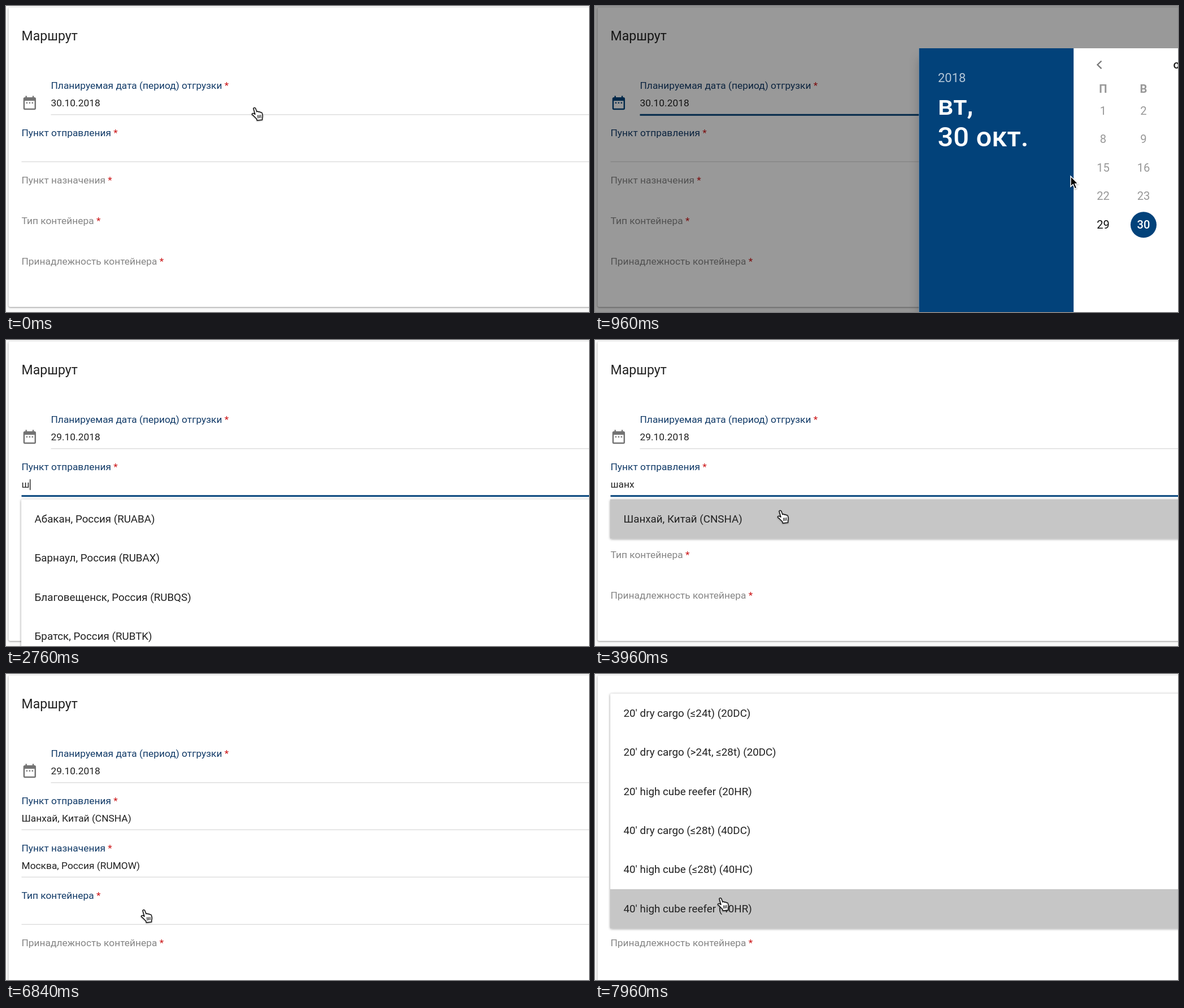
Recreate the animation shown at these times as an HTML page. Size 1032x543 px, loop 8 s.

```html
<!DOCTYPE html>
<html lang="ru">
<head>
<meta charset="utf-8">
<title>Маршрут</title>
<style>
  html, body { margin: 0; width: 100%; height: 100%; overflow: hidden; background: #f9f9f9; }
  svg { display: block; width: 100vw; height: 100vh; font-family: Roboto, sans-serif; font-size: 17.35px; fill: #212121; }
  .card { fill: #fff; filter: drop-shadow(0 1.5px 1.8px rgba(0,0,0,.42)); }
  .menu { fill: #fff; filter: drop-shadow(0 1.5px 2px rgba(0,0,0,.42)); }
  .dialog { fill: #fff; filter: drop-shadow(0 18px 9px rgba(0,0,0,.22)); }
  .item { font-size: 18.8px; }
  .day { font-size: 20.2px; text-anchor: middle; }
  .head { font-size: 49px; font-weight: 500; fill: #fff; }
</style>
</head>
<body>
<svg id="stage" viewBox="0 0 1032 543" preserveAspectRatio="none"></svg>
<script>
const LOOP = 8000, ROW = 69.4, FULL = 1960, BLUE = '#02427a';
const stage = document.getElementById('stage');
const pen = document.createElement('canvas').getContext('2d');

// Timeline of the user's actions, in ms
const T = {
  dateOpen: 120, dayPick: 1260, dateClose: 1523,
  fromFocus: 2030, fromFilter: 3560, fromSet: 4280,
  toFocus: 4700, toFilter: 5960, toSet: 6560,
  typeOpen: 7060
};
const fromKeys = { word: 'шанх', at: [2720, 2800, 2920, 3080] };
const toKeys = { word: 'моск', at: [5040, 5140, 5240, 5480] };

const shanghai = 'Шанхай, Китай (CNSHA)', moscow = 'Москва, Россия (RUMOW)';
const cities = ['Абакан, Россия (RUABA)', 'Барнаул, Россия (RUBAX)',
  'Благовещенск, Россия (RUBQS)', 'Братск, Россия (RUBTK)'];
const types = ["20' dry cargo (≤24t) (20DC)", "20' dry cargo (&gt;24t, ≤28t) (20DC)",
  "20' high cube reefer (20HR)", "40' dry cargo (≤28t) (40DC)",
  "40' high cube (≤28t) (40HC)", "40' high cube reefer (40HR)"];

const menus = [
  { open: T.fromFocus + 40, close: T.fromSet, top: 282.8, rows: t => t < T.fromFilter ? cities : [shanghai] },
  { open: T.toFocus + 40, close: T.toSet, top: 366.5, rows: t => t < T.toFilter ? cities : [moscow] },
  { open: T.typeOpen, close: Infinity, top: 34.8, rows: () => types }
];

// Pointer hot spot: time, x, y
const path = [
  [0, 439.5, 181], [260, 439.5, 181], [960, 842, 302], [1200, 897, 380], [1360, 897, 380],
  [1760, 371, 255], [1960, 368, 257], [3560, 368, 257], [3900, 327.5, 303], [4250, 327.5, 303],
  [4600, 325, 341], [5960, 325, 341], [6250, 290, 398], [6540, 290, 398],
  [6810, 243.5, 419], [7150, 243.5, 419], [7850, 221.5, 398], [8000, 221.5, 398]
];
// Pointer shape from each time on
const shapes = [[0, 'hand'], [220, 'arrow'], [1130, 'hand'], [1420, 'arrow'], [1900, 'beam'], [2720, ''],
  [3560, 'beam'], [3680, 'hand'], [4440, 'beam'], [5040, ''], [5960, 'beam'], [6080, 'hand']];

const pointers = {
  arrow: `<path d="M0 0V18.6L4.2 14.6 7.4 22.2 10.8 20.8 7.7 13.4H13.2Z" fill="#000" stroke="#fff" stroke-width="1.5"/>`,
  beam: `<path d="M-3.5-9Q0-9 0-6.5V6.5Q0 9-3.5 9M3.5-9Q0-9 0-6.5V6.5Q0 9 3.5 9M-2 3H2" fill="none" stroke="#333" stroke-width="1.4"/>`,
  hand: `<g transform="translate(-5.5 -1.5)" fill="#fff" stroke="#111" stroke-width="1.5" stroke-linejoin="round">
    <path d="M4 2.2C4.6.6 7 .6 7.8 2.4L10 8.2C11 7.2 12.6 7.4 13.2 8.6 14.2 7.8 15.8 8.2 16.3 9.4 17.6 8.8 19 9.6 19.4 11 20.4 14 20.6 17 19.6 19.2V22.5L10.4 23.5 9.6 20.6C7 18.5 5 15.5 2 13.6.6 12.4 2 10.6 4 11 5.2 11.3 6 12 7 12.8Z"/>
    <path d="M11.5 14.2l.8 5.6M14.1 13.9l.6 5.5M16.8 13.6l.4 5.4" fill="none" stroke-width="1.2"/></g>`
};

const clamp = v => Math.max(0, Math.min(1, v));
const easeOut = p => 1 - (1 - clamp(p)) ** 4;
const shown = (t, on, off, inMs, outMs) => t < on ? 0 : t < off
  ? easeOut((t - on) / inMs) : 1 - easeOut((t - off) / outMs);

const text = (x, y, s, attrs = '') => `<text x="${x}" y="${y}" ${attrs}>${s}</text>`;
const rect = (x, y, w, h, attrs = '') => `<rect x="${x}" y="${y}" width="${w}" height="${h}" ${attrs}/>`;
const typed = (t, k) => k.word.slice(0, k.at.filter(a => a <= t).length);

function pointerAt(t) {
  const i = Math.max(1, path.findIndex(p => p[0] > t));
  const [t0, x0, y0] = path[i - 1], [t1, x1, y1] = path[i];
  const p = clamp((t - t0) / (t1 - t0)), e = p * p * (3 - 2 * p);
  return { x: x0 + (x1 - x0) * e, y: y0 + (y1 - y0) * e, shape: shapes.filter(s => s[0] <= t).pop()[1] };
}

function label(x, y, s, on) {
  return text(x, y, `${s} <tspan fill="#cc1719">*</tspan>`, `fill="${on ? '#123b68' : '#858585'}"`);
}

function underline(x, y, focus) {
  const mid = 990, half = (mid - x) * focus;
  return rect(x, y - .6, FULL - x, 1.4, 'fill="#dcdcdc"') +
    (focus > 0 ? rect(mid - half, y - 1, half * 2, 3, `fill="${BLUE}"`) : '');
}

function caret(t, s, y, focus, keys) {
  const last = Math.max(focus, ...keys.at.filter(a => a <= t));
  if (Math.floor((t - last) / 530) % 2) return '';
  pen.font = '17.35px Roboto, sans-serif';
  return rect(28 + pen.measureText(s).width, y - 14.5, 1.4, 19);
}

function form(t) {
  const fromDone = t >= T.fromSet, toDone = t >= T.toSet;
  const picking = t >= T.dateOpen && t < T.dateClose;
  const fields = [
    { name: 'Пункт отправления', on: true, value: fromDone ? shanghai : typed(t, fromKeys),
      focus: T.fromFocus, blur: T.fromSet, keys: fromKeys },
    { name: 'Пункт назначения', on: fromDone, value: toDone ? moscow : typed(t, toKeys),
      focus: T.toFocus, blur: T.toSet, keys: toKeys },
    { name: 'Тип контейнера', on: toDone, value: '' },
    { name: 'Принадлежность контейнера', on: false }
  ];
  let y = 231, out = '';
  for (const f of fields) {
    out += label(27.5, y, f.name, f.on);
    if (f.on) {
      out += text(27.5, y + 30.7, f.value);
      out += underline(27.5, y + 45.3, f.focus ? shown(t, f.focus, f.blur, 450, 120) : 0);
      if (f.focus && t >= f.focus && t < f.blur) out += caret(t, f.value, y + 30.7, f.focus, f.keys);
    }
    y += f.on ? 84 : 72;
  }
  return rect(4.5, 2.5, FULL, y + .5, 'rx="3" class="card"') +
    text(27.5, 61, 'Маршрут', 'font-size="23.1"') +
    `<path transform="translate(27 157) scale(1.24)" fill="${picking ? BLUE : '#737373'}" d="M9 11H7v2h2zm4 0h-2v2h2zm4 0h-2v2h2zm2-7h-1V2h-2v2H8V2H6v2H5C3.9 4 3 4.9 3 6V20c0 1.1.9 2 2 2h14c1.1 0 2-.9 2-2V6c0-1.1-.9-2-2-2zm0 16H5V9h14z" fill-rule="evenodd"/>` +
    label(79.5, 147, 'Планируемая дата (период) отгрузки', true) +
    text(79.5, 177.7, t < T.dateClose ? '30.10.2018' : '29.10.2018') +
    underline(79.5, 192.7, shown(t, T.dateOpen, T.dateClose, 450, 120)) + out;
}

function menu(t, m, ptr) {
  const k = shown(t, m.open, m.close, 400, 180);
  if (k <= 0) return '';
  const rows = m.rows(t), grow = t < m.close ? k : 1;
  const hover = ptr.shape === 'hand' ? Math.floor((ptr.y - m.top) / ROW) : -1;
  const body = rows.map((s, i) =>
    (i === hover ? rect(27, i * ROW, FULL, ROW, 'fill="#c6c6c6"') : '') +
    text(50.5, i * ROW + 41, s, 'class="item"')).join('');
  return `<g transform="translate(0 ${m.top}) scale(1 ${grow})" opacity="${k}">` +
    rect(27, 0, FULL, rows.length * ROW, 'rx="2" class="menu"') + body + '</g>';
}

function calendar(t) {
  const k = shown(t, T.dateOpen, T.dateClose, 450, 450);
  const shade = shown(t, T.dateOpen, T.dateClose, 450, 500);
  if (shade <= 0) return '';
  const picked = t < T.dayPick ? 30 : 29;
  let days = '';
  ['П', 'В', 'С'].forEach((d, col) => {
    const x = 899.5 + col * 71.5;
    days += text(x, 153.5, d, 'class="day" font-weight="700" fill="#989898"');
    for (let row = 0; row < 5; row++) {
      const n = row * 7 + col + 1, y = 185.5 + row * 50.5, on = n === picked;
      if (on) days += `<circle cx="${x}" cy="${y + .8}" r="23" fill="${BLUE}"/>`;
      days += text(x, y + 7, n, `class="day" fill="${on ? '#fff' : n < 29 ? '#989898' : '#111'}"${on ? ' font-weight="500"' : ''}`);
    }
  });
  return rect(0, 0, 1032, 543, `fill="#000" opacity="${.4 * shade}"`) +
    `<g transform="translate(0 ${-42 * (1 - k)})" opacity="${k}">` +
    rect(573.5, 75, 836, 474, 'class="dialog"') + rect(573.5, 75, 273.7, 474, `fill="${BLUE}"`) +
    text(607, 134.5, '2018', 'font-size="22" fill="#fff" fill-opacity=".7"') +
    text(606.5, 193, picked === 30 ? 'вт,' : 'пн,', 'class="head"') +
    text(606.5, 249, picked + ' окт.', 'class="head"') +
    '<path d="M896.5 97.5l-7 6.8 7 6.8" fill="none" stroke="#777" stroke-width="2.3"/>' +
    text(1023.5, 111, 'октябрь 2018', 'font-size="20.2" font-weight="500"') + days + '</g>';
}

function draw(t) {
  const ptr = pointerAt(t);
  stage.innerHTML = form(t) + menus.map(m => menu(t, m, ptr)).join('') + calendar(t) +
    (ptr.shape ? `<g transform="translate(${ptr.x} ${ptr.y})" style="filter:drop-shadow(0 1.5px 1px rgba(0,0,0,.35))">${pointers[ptr.shape]}</g>` : '');
}

const start = performance.now();
function tick() {
  draw((performance.now() - start) % LOOP);
  requestAnimationFrame(tick);
}
tick();
</script>
</body>
</html>
```
